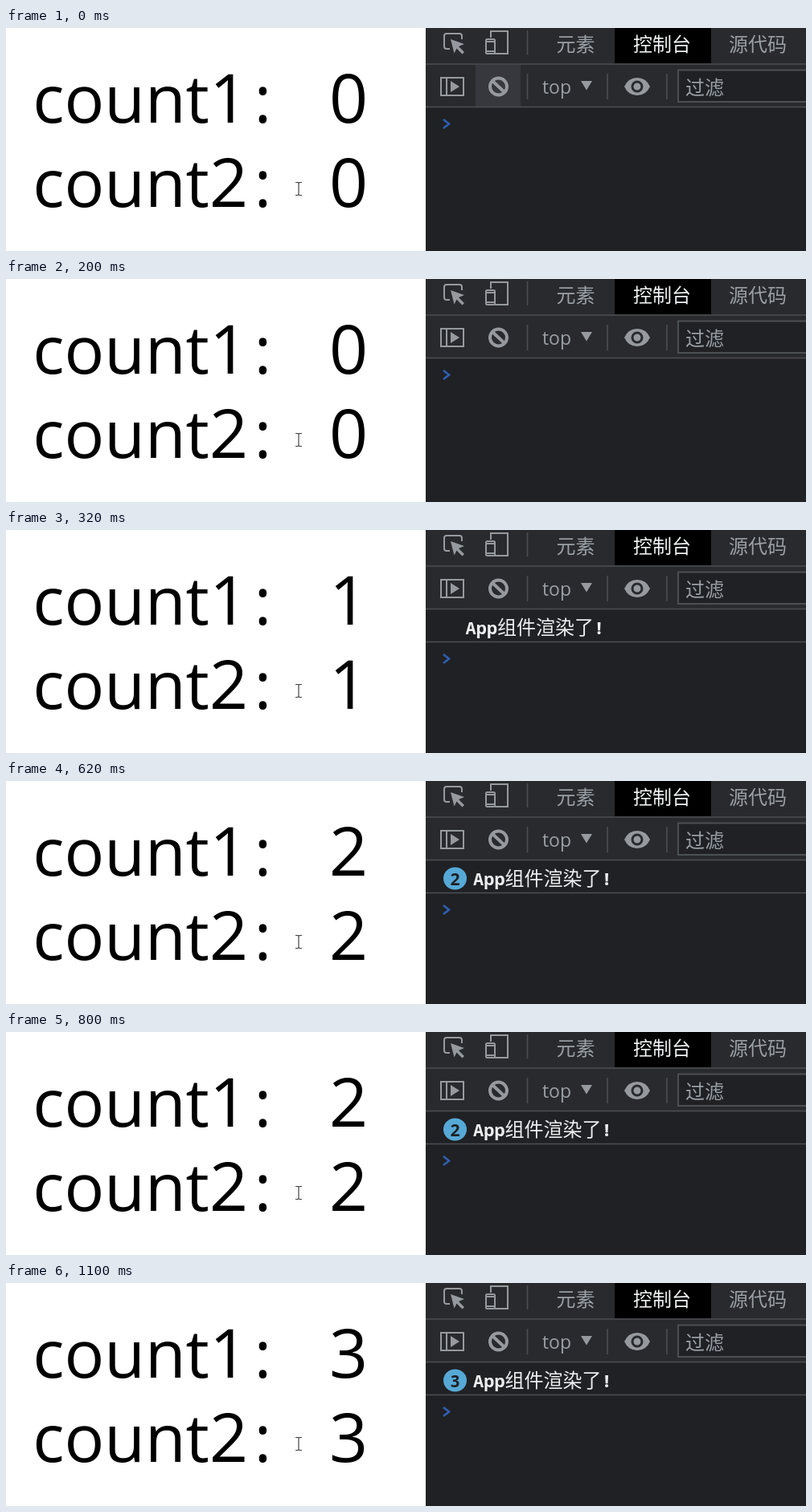
Animation of 995x278 px, one loop 1220 ms. Source, as an HTML page:

```html
<!DOCTYPE html>
<html lang="zh">
<head>
<meta charset="utf-8">
<title>Counter and console</title>
<style>
  html, body { margin: 0; width: 100%; height: 100%; overflow: hidden; background: #fff; }
  svg { display: block; width: 995px; height: 278px; }
  .count { font: 82.5px "Open Sans", "Noto Sans", sans-serif; fill: #000; }
  .digit { font-size: 84px; }
  .colon { font-size: 80px; }
  .ui { font: 24px "Noto Sans CJK SC", "Noto Sans CJK", sans-serif; fill: #9aa0a6; }
  .ui .active { fill: #f1f3f4; }
  .ui .latin { font: 23px "Open Sans", "Noto Sans", sans-serif; }
  .log { font: 600 22px "Noto Sans Mono", monospace; fill: #eceef0; }
  .log .zh { font: 24px "Noto Sans CJK SC", "Noto Sans CJK", sans-serif; }
  .badge { font: 700 21px "Noto Sans Mono", monospace; fill: #202124; text-anchor: middle; }
  .icon { fill: none; stroke: #969a9e; stroke-width: 2; }
  .thick { stroke-width: 4; }
  .solid { fill: #969a9e; }
  .rule { fill: none; stroke: #4b4e51; stroke-width: 1.6; }
</style>
</head>
<body>
<svg viewBox="0 0 995 278">
  <g class="count">
    <text x="33.2" y="118">count</text>
    <text class="digit" x="253" y="118">1</text>
    <text class="colon" x="308.8" y="118">:</text>
    <text class="digit value" x="402" y="118"></text>
    <text x="33.2" y="223">count</text>
    <text class="digit" x="253" y="223">2</text>
    <text class="colon" x="308.8" y="223">:</text>
    <text class="digit value" x="402" y="223"></text>
  </g>

  <circle id="click" cx="362" cy="200" r="12" fill="#fbfb78"/>
  <path d="M360 192.5h3l1 1l1 -1h3M364 193v14M360 208.5h3l1 -1l1 1h3" fill="none" stroke="#444" stroke-width="1.2"/>

  <!-- Toolbars -->
  <rect x="522" width="473" height="278" fill="#202124"/>
  <rect x="522" width="473" height="99" fill="#292a2d"/>
  <rect x="757" width="120" height="44" fill="#000"/>
  <rect id="hover" x="584" y="46" width="56" height="52" fill="#37383d"/>
  <path class="rule" d="M522 45H995M522 98.500H995M648.500 3V33M648.500 57V89M748 57V89M822 57V89"/>

  <path class="icon" d="M552 26h-4q-3 0 -3 -3v-13q0 -3 3 -3h16q3 0 3 3v4"/>
  <path class="solid" d="M553 14l17 6l-7 3l7 7l-2.500 2.500l-7 -7l-3 6z"/>
  <path class="icon" d="M603 12V4H624V32H608"/>
  <rect class="icon" x="597" y="14" width="11" height="18" rx="1.500"/>
  <path class="icon" d="M597 17h11M597 29h11"/>

  <path class="icon" d="M541 62H569V84H541ZM548 62V84"/>
  <path class="solid" d="M553 66l11 7l-11 7z"/>
  <circle class="icon thick" cx="612.500" cy="73" r="10.500"/>
  <path class="icon thick" d="M605 66l15 14"/>
  <path class="solid" d="M715 66H729L722 77.500Z"/>
  <path class="solid" d="M769 73Q774 62 785 62T801 73Q796 84 785 84T769 73Z"/>
  <circle cx="785" cy="73" r="6" fill="none" stroke="#292a2d" stroke-width="3"/>

  <path d="M1000 52.500H836V92H1000" fill="#202124" stroke="#4b5052" stroke-width="2"/>
  <g class="ui">
    <text x="684.500" y="28.500">元素</text>
    <text class="active" x="780" y="28.500">控制台</text>
    <text x="899" y="28.500">源代码</text>
    <text class="latin" x="667" y="82">top</text>
    <text x="845" y="83">过滤</text>
  </g>

  <!-- Console -->
  <g id="message">
    <path class="rule" d="M522 139.500H995"/>
    <g id="badge">
      <ellipse cx="558.500" cy="121.500" rx="14.500" ry="14" fill="#56a9d6"/>
      <text class="badge" id="repeats" x="558.500" y="129.500"></text>
    </g>
    <text class="log" id="line" y="129.500">App<tspan class="zh">组件渲染了</tspan>!</text>
  </g>
  <path id="prompt" d="M544 -5.500l7 5.500l-7 5.500" fill="none" stroke="#2f5fb3" stroke-width="2.600"/>
</svg>
<script>
  const LOOP = 1220;
  const STEPS = [
    { at: 0, count: 0, hover: true },
    { at: 200, count: 0 },
    { at: 320, count: 1 },
    { at: 520, count: 1, click: true },
    { at: 620, count: 2 },
    { at: 920, count: 3 }
  ];
  const get = id => document.getElementById(id);
  const show = (id, on) => get(id).setAttribute("visibility", on ? "visible" : "hidden");
  const values = document.querySelectorAll(".value");
  let current;

  function render({ count, hover, click }) {
    for (const value of values) value.textContent = count;
    show("hover", hover);
    show("click", click);
    show("message", count > 0);
    // An explicit "visible" would override the hidden message group
    show("badge", count > 1);
    get("repeats").textContent = count;
    get("line").setAttribute("x", count > 1 ? 581 : 571.5);
    get("prompt").setAttribute("transform", `translate(0 ${count ? 160.5 : 119.5})`);
  }

  const start = performance.now();
  function tick() {
    const time = (performance.now() - start) % LOOP;
    const step = STEPS.findLast(s => s.at <= time);
    if (step !== current) render(current = step);
    requestAnimationFrame(tick);
  }
  tick();
</script>
</body>
</html>
```
